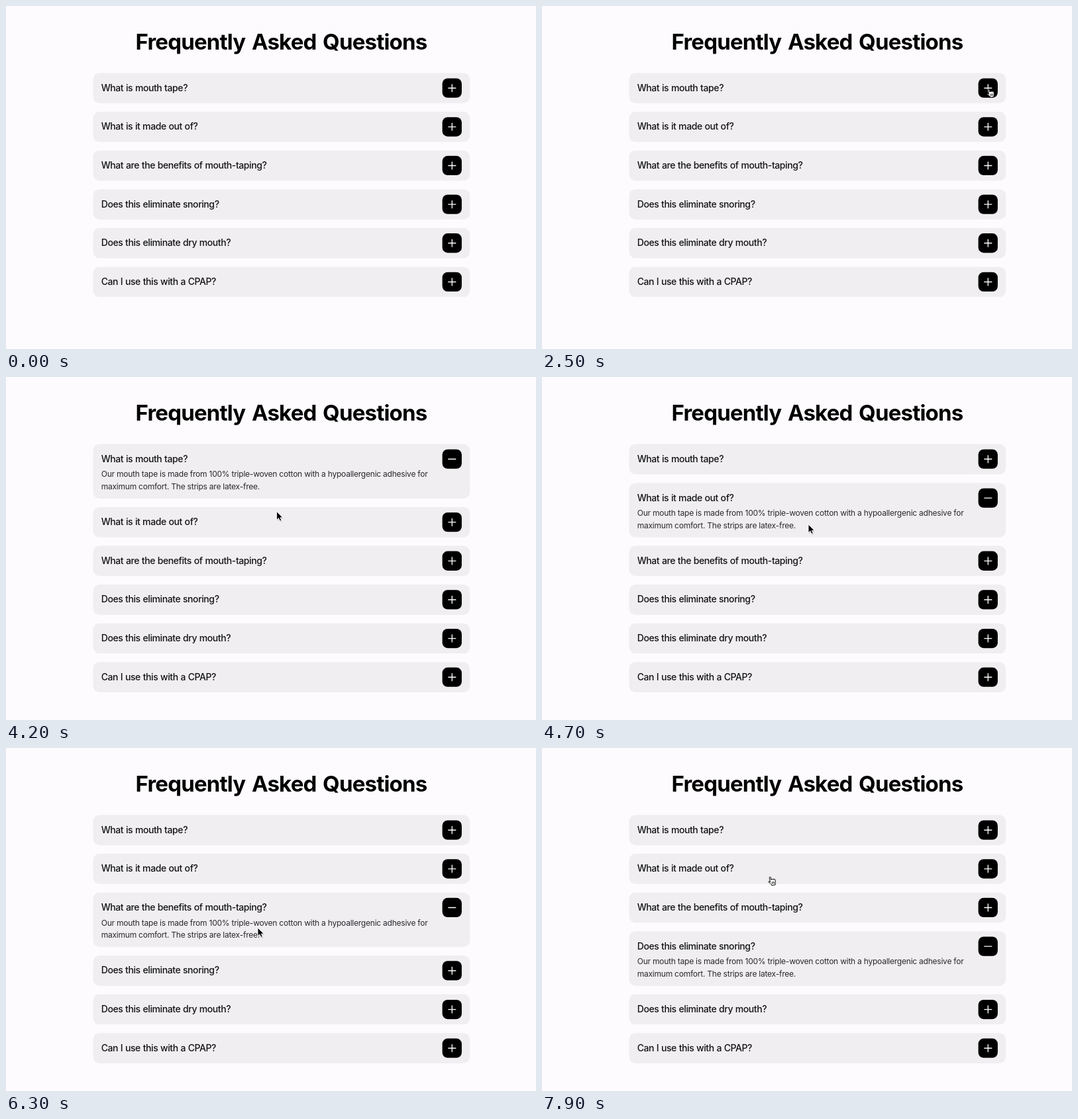
An HTML page that plays this animation: 800 by 519 pixels, repeating every 8000 ms.

```html
<!DOCTYPE html>
<html lang="en">
<head>
<meta charset="utf-8">
<title>Frequently Asked Questions</title>
<style>
  html, body { margin: 0; width: 100%; height: 100%; overflow: hidden; background: #fdfbfe; }
  svg { display: block; }
  text { font-family: Inter, Roboto, sans-serif; }
  .heading { font-size: 33px; font-weight: 700; letter-spacing: -.8px; word-spacing: 2.5px; text-anchor: middle; }
  .question { font-size: 14px; font-weight: 500; letter-spacing: -.41px; word-spacing: .4px; fill: #131315; }
  .answer { font-size: 12px; letter-spacing: -.23px; fill: #29282c; }
  .bar { stroke: #fff; stroke-width: 1.35; }
</style>
</head>
<body>
<svg width="800" height="519" viewBox="0 0 800 519">
  <text class="heading" x="415.5" y="66">Frequently Asked Questions</text>
  <g id="rows"></g>
  <g id="cursor">
    <g id="arrow">
      <path d="M1 1.6V14.2L4 11.5L6 16L8.3 15L6.4 10.7H10.2Z" opacity=".18"/>
      <path d="M0 0V12.6L2.9 9.9L4.9 14.4L7.2 13.4L5.3 9.2H9.2Z" stroke="#fff" stroke-width=".9" stroke-linejoin="round"/>
    </g>
    <g id="hand" transform="rotate(-10) translate(-4.3 -.6)" stroke="#000" stroke-width=".9" stroke-linejoin="round" stroke-linecap="round">
      <path fill="#fff" d="M3.3 8.4V1.7a1 1 0 0 1 2 0V5.3a1 1 0 0 1 2 .1a1 1 0 0 1 2 .4a1 1 0 0 1 2 .6V9.5c0 1.2-.9 1.8-.9 2.6V13.8H4.7V12.6C4.2 11.4 2 9.6 1.1 8.3C.5 7.2 1.8 6.5 2.5 7.3Z"/>
      <path d="M5.9 8.8v2.6m1.6-2.6v2.6m1.6-2.6v2.6" stroke-width=".7"/>
    </g>
  </g>
</svg>
<script>
const LOOP = 8000, STEP = 100;
const TOP = 101.2, GAP = 12.65, CLOSED = 46, EXTRA = 36.8, TOGGLE = 220;

const questions = [
  "What is mouth tape?",
  "What is it made out of?",
  "What are the benefits of mouth-taping?",
  "Does this eliminate snoring?",
  "Does this eliminate dry mouth?",
  "Can I use this with a CPAP?"
];
const answer = [
  "Our mouth tape is made from 100% triple-woven cotton with a hypoallergenic adhesive for",
  "maximum comfort. The strips are latex-free."
];

// Row n opens at clicks[n] and closes at the following click.
const clicks = [2900, 4500, 5800, 7400];

// Each move starts where the one before it stopped.
const entry = { x: 800, y: 350 };
const moves = [
  { start: 1000, end: 2600, x: 674, y: 125.5, power: 3, pointer: "hand" },
  { start: 2900, end: 3800, x: 435, y: 126, power: 3, pointer: "arrow" },
  { start: 3800, end: 4300, x: 402, y: 223, power: 1, pointer: "arrow" },
  { start: 4900, end: 5700, x: 380, y: 272, power: 1, pointer: "arrow" },
  { start: 6500, end: 7400, x: 367, y: 335, power: 1, pointer: "arrow" },
  { start: 7500, end: 7900, x: 344, y: 195, power: 1, pointer: "hand" }
];

const byId = id => document.getElementById(id);
const mix = (a, b, k) => a + (b - a) * k;

function easeOut(t, start, end, power) {
  const p = Math.min(1, Math.max(0, (t - start) / (end - start)));
  return 1 - (1 - p) ** power;
}

function add(parent, tag, attrs, text = "") {
  const el = document.createElementNS("http://www.w3.org/2000/svg", tag);
  for (const key in attrs) el.setAttribute(key, attrs[key]);
  el.textContent = text;
  return parent.appendChild(el);
}

const rows = questions.map(question => {
  const box = add(byId("rows"), "svg", { x: 131.3, width: 569, overflow: "hidden" });
  const panel = add(box, "rect", { width: 569, rx: 10, fill: "#f0eef1" });
  add(box, "text", { class: "question", x: 12.4, y: 27.4 }, question);
  const body = add(box, "g", {});
  answer.forEach((line, i) => add(body, "text", { class: "answer", x: 12.4, y: 50.2 + i * 18.4 }, line));
  add(box, "rect", { x: 527.3, y: 8.3, width: 29.3, height: 29.3, rx: 8 });
  add(box, "path", { class: "bar", d: "M536 23H548" });
  const upright = add(box, "path", { class: "bar" });
  return { box, panel, body, upright };
});

const clicked = (t, n) => n < clicks.length ? easeOut(t, clicks[n], clicks[n] + TOGGLE, 2) : 0;

function drawRows(t) {
  let y = TOP;
  rows.forEach(({ box, panel, body, upright }, n) => {
    const open = clicked(t, n) && clicked(t, n) - clicked(t, n + 1);
    const height = CLOSED + EXTRA * open, half = 6 * (1 - open);
    box.setAttribute("y", y);
    box.setAttribute("height", height);
    panel.setAttribute("height", height);
    body.setAttribute("opacity", open);
    upright.setAttribute("d", `M542 ${23 - half}V${23 + half}`);
    y += height + GAP;
  });
}

function drawCursor(t) {
  let { x, y } = entry, pointer = "";
  for (const move of moves.filter(({ start }) => start < t)) {
    const k = easeOut(t, move.start, move.end, move.power);
    x = mix(x, move.x, k);
    y = mix(y, move.y, k);
    pointer = x > 700 ? "arrow" : move.pointer;
  }
  for (const id of ["arrow", "hand"]) byId(id).style.display = id === pointer ? "" : "none";
  byId("cursor").setAttribute("transform", `translate(${x} ${y})`);
}

const began = performance.now();
function tick() {
  const elapsed = (performance.now() - began) % LOOP;
  const t = Math.floor(elapsed / STEP) * STEP;
  drawRows(t);
  drawCursor(t);
  requestAnimationFrame(tick);
}
tick();
</script>
</body>
</html>
```
